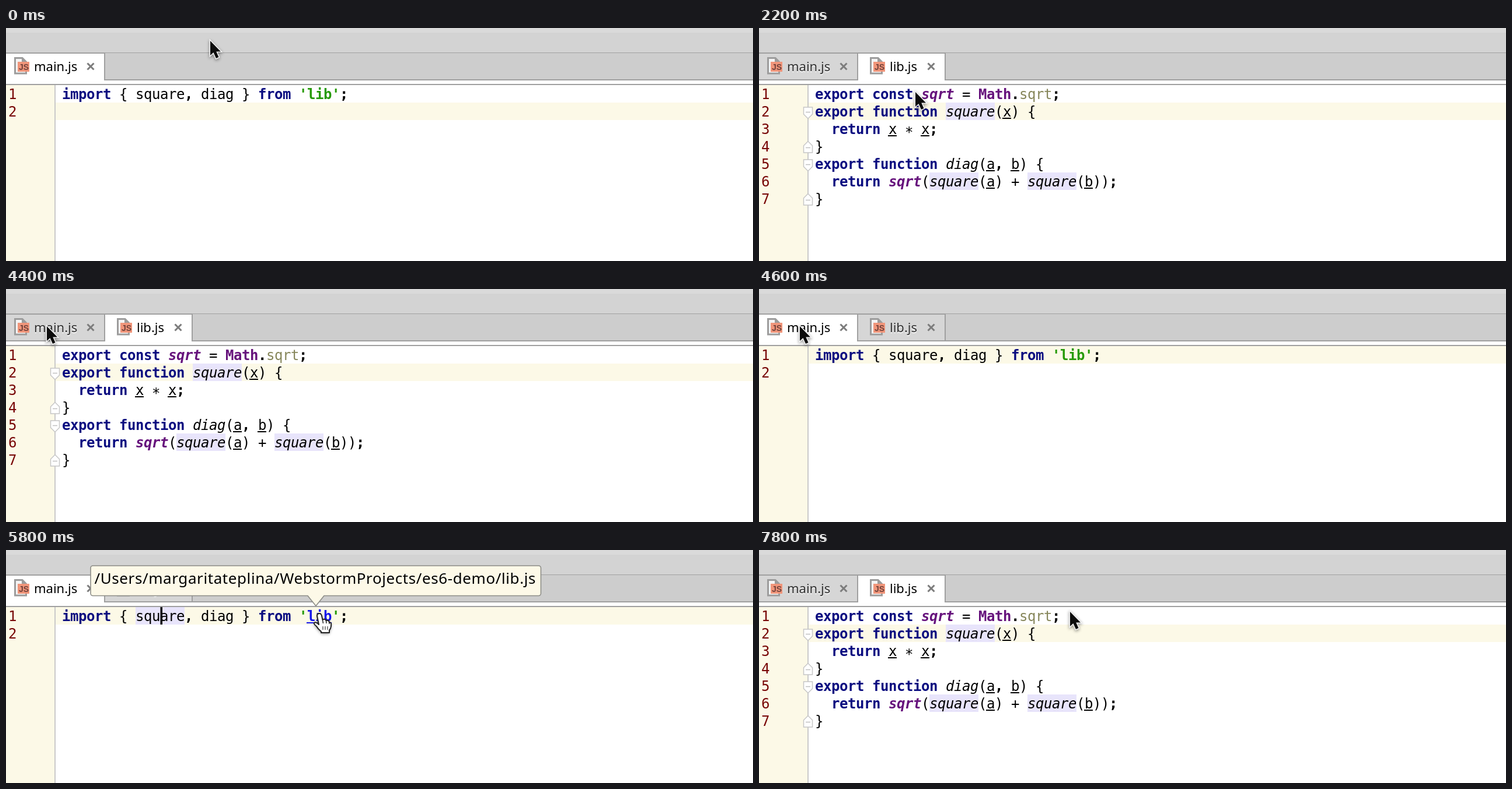
These frames come from a looping animation (1280 px wide and 400 px high, 8 s). An HTML page with a canvas:

```html
<!DOCTYPE html>
<html lang="en">
<head>
<meta charset="utf-8">
<title>Jump to definition</title>
<style>
html, body { margin: 0; width: 100%; height: 100%; overflow: hidden; background: #fff; }
canvas { display: block; width: 100vw; height: 100vh; }
</style>
</head>
<body>
<canvas id="stage" width="1280" height="400"></canvas>
<script>
const ctx = document.getElementById('stage').getContext('2d');
const LOOP = 8000, STEP = 200;
const LEFT = 96, TOP = 98, ROW = 30, CHAR = 14;
const MONO = '"DejaVu Sans Mono", monospace';
const SANS = '"Noto Sans", "Open Sans", sans-serif';
const CREAM = '#fcf9e7', EDGE = '#a0a0a0';

// Token styles: font prefix, colour, underline, vertical offset
const STYLES = {
  plain: ['', '#000'],
  punct: ['bold', '#000'],
  key: ['bold', '#0a0c80'],
  str: ['bold', '#269a08'],
  name: ['italic', '#000'],
  field: ['italic bold', '#66127c'],
  obj: ['bold', '#66127c'],
  prop: ['', '#86865a'],
  arg: ['', '#000', true],
  star: ['', '#000', false, 5],
  link: ['', '#1c1cdc', true],
  boldLink: ['bold', '#1616ea', true]
};

const mainCode = link => [[
  ['key', 'import'], ['plain', ' { '],
  [link === 'square' ? 'link' : 'plain', 'square'], ['punct', ','],
  ['plain', ' diag } '], ['key', 'from'], ['plain', ' '], ['str', "'"],
  [link === 'lib' ? 'boldLink' : 'str', 'lib'], ['str', "'"], ['punct', ';']
], []];

const LIB_CODE = [
  [['key', 'export const '], ['field', 'sqrt'], ['plain', ' = '], ['obj', 'Math'],
    ['punct', '.'], ['prop', 'sqrt'], ['punct', ';']],
  [['key', 'export function '], ['name', 'square'], ['plain', '('], ['arg', 'x'], ['plain', ') {']],
  [['key', '  return '], ['arg', 'x'], ['plain', ' '], ['star', '*'], ['plain', ' '],
    ['arg', 'x'], ['punct', ';']],
  [['plain', '}']],
  [['key', 'export function '], ['name', 'diag'], ['plain', '('], ['arg', 'a'],
    ['punct', ','], ['plain', ' '], ['arg', 'b'], ['plain', ') {']],
  [['key', '  return '], ['field', 'sqrt'], ['plain', '('], ['name', 'square'], ['plain', '('],
    ['arg', 'a'], ['plain', ') + '], ['name', 'square'], ['plain', '('], ['arg', 'b'],
    ['plain', '))'], ['punct', ';']],
  [['plain', '}']]
];

// Pointer stops: time, x, y
const STOPS = [
  [0, 349, 20], [200, 349, 20], [1000, 267, 108], [3800, 267, 108], [4400, 69, 62],
  [4800, 69, 62], [5400, 535, 104], [5800, 535, 104], [6000, 532, 104], [LOOP, 532, 104]
];

// start, end, file, current row, caret column, caret phase, usages shown from
const SCENES = [
  { end: 1600, file: 'main', row: 1, col: 0, phase: 100, tabs: 1 },
  { end: 4600, file: 'lib', row: 1, col: 16, phase: 1500, usages: 1800, tabs: 2 },
  { end: 6000, file: 'main', row: 0, col: 12, phase: 5400, usages: 4800, caretFrom: 4700, tabs: 2 },
  { end: LOOP, file: 'lib', row: 1, col: 16, phase: 5900, usages: 6000, tabs: 2 }
];
const USAGES = { main: [[0, 9]], lib: [[1, 16], [5, 14], [5, 26]] };

const colX = col => LEFT + col * CHAR;
const rowY = row => TOP + row * ROW;

function rect(x, y, w, h, color) {
  ctx.fillStyle = color;
  ctx.fillRect(x, y, w, h);
}

function text(str, x, y, font, color, spacing = 0) {
  ctx.font = font;
  ctx.letterSpacing = spacing + 'px';
  ctx.fillStyle = color;
  ctx.fillText(str, x, y);
}

function poly(points, x = 0, y = 0) {
  ctx.beginPath();
  points.forEach(([px, py]) => ctx.lineTo(x + px, y + py));
  ctx.closePath();
}

function line(x1, y1, x2, y2, color, width) {
  ctx.beginPath();
  ctx.moveTo(x1, y1);
  ctx.lineTo(x2, y2);
  ctx.strokeStyle = color;
  ctx.lineWidth = width;
  ctx.stroke();
}

function mono(str, x, y, style, color) {
  text(str, x, y, `${style} 24px ${MONO}`, color, CHAR - 24 * 0.602);
}

function fileIcon(x) {
  poly([[1.5, 1.5], [14, 1.5], [20.5, 8], [20.5, 28], [1.5, 28]], x, 50);
  ctx.fillStyle = '#f4f4f4';
  ctx.fill();
  ctx.strokeStyle = '#9c9c9c';
  ctx.lineWidth = 3;
  ctx.stroke();
  poly([[13, 1], [22, 10], [13, 10]], x, 50);
  ctx.fillStyle = '#9c9c9c';
  ctx.fill();
  rect(x + 6, 58, 20, 17, '#f0957a');
  text('JS', x + 8, 72, 'bold 14px "Liberation Sans", sans-serif', '#70413a');
}

function tab(x, w, label, active) {
  rect(x, 42, w, 48, active ? '#fff' : '#d6d6d6');
  rect(x, 42, w, 2, EDGE);
  rect(x + w - 2, 42, 2, 48, EDGE);
  if (!active) rect(x, 88, w, 2, EDGE);
  const left = x ? x + 20 : 14, right = x + w - 25;
  fileIcon(left);
  const font = `22px ${SANS}`;
  if (!active) text(label, left + 34, 75.5, font, 'rgba(255,255,255,.75)');
  text(label, left + 34, 74, font, active ? '#000' : '#333');
  line(right - 5.5, 60.5, right + 5.5, 71.5, '#7c7c7c', 3);
  line(right - 5.5, 71.5, right + 5.5, 60.5, '#7c7c7c', 3);
}

function chrome(scene) {
  rect(0, 0, 1280, 400, '#fff');
  rect(0, 0, 1280, 8, '#dadada');
  rect(0, 8, 1280, 34, '#d3d3d3');
  rect(0, 42, 1280, 1, EDGE);
  rect(0, 43, 1280, 46, '#cdcdcd');
  rect(0, 88, 1280, 2, EDGE);
  tab(0, 170, 'main.js', scene.file === 'main');
  if (scene.tabs > 1) tab(170, 150, 'lib.js', scene.file === 'lib');
  rect(0, 96, 1280, 2, EDGE);
  rect(0, TOP, 83, 302, CREAM);
  rect(83, TOP, 2, 302, '#cacaca');
}

function fold(row, closing) {
  const y = rowY(row) + (closing ? 26 : 8), d = closing ? -1 : 1;
  poly([[76.5, 0], [91.5, 0], [91.5, 12 * d], [84, 19.5 * d], [76.5, 12 * d]], 0, y);
  ctx.fillStyle = '#fff';
  ctx.fill();
  ctx.strokeStyle = '#c6c6c6';
  ctx.lineWidth = 1.5;
  ctx.stroke();
  line(80, y + 8.5 * d, 88, y + 8.5 * d, '#c0c0c0', 1.5);
}

function codeLine(tokens, row) {
  const base = rowY(row) + 24;
  let col = 0;
  for (const [kind, str] of tokens) {
    const [style, color, under, dy = 0] = STYLES[kind];
    mono(str, colX(col), base + dy, style, color);
    if (under) rect(colX(col) - 1, base + 2, str.length * CHAR + 1, 2, color);
    col += str.length;
  }
}

function editor(scene, t, link) {
  rect(85, rowY(scene.row), 1195, ROW, CREAM);
  if (t >= scene.usages) {
    for (const [row, col] of USAGES[scene.file]) {
      rect(colX(col), rowY(row), 6 * CHAR, ROW, '#e8e4fb');
    }
  }
  const lines = scene.file === 'lib' ? LIB_CODE : mainCode(link);
  lines.forEach((tokens, row) => {
    mono(String(row + 1), 4, rowY(row) + 24, '', '#780606');
    codeLine(tokens, row);
  });
  if (scene.file === 'lib') {
    for (const row of [1, 4]) fold(row, false);
    for (const row of [3, 6]) fold(row, true);
  }
  const phase = (t - scene.phase + LOOP) % 1000;
  if (phase < 500 && t >= (scene.caretFrom || 0)) {
    rect(colX(scene.col) + 0.5, rowY(scene.row), 3.5, ROW, '#000');
  }
}

function tooltip(x, y, w, tip, lines) {
  const r = x + w, b = 78.5, c = 4;
  ctx.beginPath();
  ctx.moveTo(x + c, y);
  ctx.arcTo(r, y, r, b, c);
  ctx.arcTo(r, b, x, b, c);
  ctx.lineTo(tip + 14, b);
  ctx.lineTo(tip, 96);
  ctx.lineTo(tip - 14, b);
  ctx.arcTo(x, b, x, y, c);
  ctx.arcTo(x, y, r, y, c);
  ctx.closePath();
  ctx.fillStyle = '#fdf9e8';
  ctx.fill();
  ctx.strokeStyle = '#8c8c86';
  ctx.lineWidth = 1.6;
  ctx.stroke();
  lines.forEach((str, i) => text(str, x + 6.5, y + 31 + i * 32, `26px ${SANS}`, '#000', 0.58));
}

function shade(on) {
  ctx.shadowColor = on ? 'rgba(0,0,0,.45)' : 'transparent';
  ctx.shadowBlur = on ? 5 : 0;
  ctx.shadowOffsetY = on ? 2 : 0;
}

function arrow(x, y) {
  poly([[1, 2], [1, 27], [6.5, 22], [11, 32], [15.5, 30], [11.3, 20.5], [19, 20.5]], x, y);
  ctx.lineJoin = 'miter';
  ctx.strokeStyle = '#f4f4f4';
  ctx.lineWidth = 3;
  shade(true);
  ctx.stroke();
  shade(false);
  ctx.fillStyle = '#0c0c0c';
  ctx.fill();
}

const HAND = new Path2D(`M-4 4Q-4 0 0 0Q3 0 4 4L5.5 11Q7 9 9.5 10Q11 10.5 11.5 12.5
  Q13.5 11 15.5 12.5Q16.5 13 16.8 15Q19 14.5 20 17Q20.5 19 20 22Q19.5 26 17 29V33H3V31
  Q-2 27 -5 22Q-10 18 -9 16Q-7 14 -3 17L-1 19Z`);

function hand(x, y) {
  ctx.save();
  ctx.translate(x, y);
  ctx.lineJoin = 'round';
  ctx.fillStyle = '#fff';
  shade(true);
  ctx.fill(HAND);
  shade(false);
  ctx.strokeStyle = '#222';
  ctx.lineWidth = 2;
  ctx.stroke(HAND);
  line(5.5, 11, 6.5, 17, '#222', 1.5);
  line(11.5, 12.5, 12, 17, '#222', 1.5);
  line(16.8, 15, 17, 18, '#222', 1.5);
  for (const fx of [6, 10, 14]) line(fx, 22, fx, 28, '#555', 1.4);
  ctx.restore();
}

function pointerAt(t) {
  const i = STOPS.findIndex(stop => stop[0] > t);
  const [t0, x0, y0] = STOPS[i - 1], [t1, x1, y1] = STOPS[i];
  const p = (t - t0) / (t1 - t0), e = p * p * (3 - 2 * p);
  return [x0 + (x1 - x0) * e, y0 + (y1 - y0) * e];
}

function draw(t) {
  const scene = SCENES.find(s => t < s.end);
  const within = (a, b) => t >= a && t < b;
  const link = within(1000, 1600) ? 'square' : within(5400, 6000) ? 'lib' : '';
  chrome(scene);
  editor(scene, t, link);
  if (within(1200, 1600)) {
    tooltip(100.5, 7, 326, 265, ['lib.js', 'public function square(x)']);
  }
  if (link === 'lib') {
    tooltip(145, 27, 771.5, 531, ['/Users/margaritateplina/WebstormProjects/es6-demo/lib.js']);
  }
  const [x, y] = pointerAt(t);
  if (link) hand(x + 2, y + 5);
  else arrow(x, y);
}

function tick() {
  const now = performance.now() % LOOP;
  draw(Math.floor(now / STEP) * STEP);
  requestAnimationFrame(tick);
}
tick();
</script>
</body>
</html>
```
